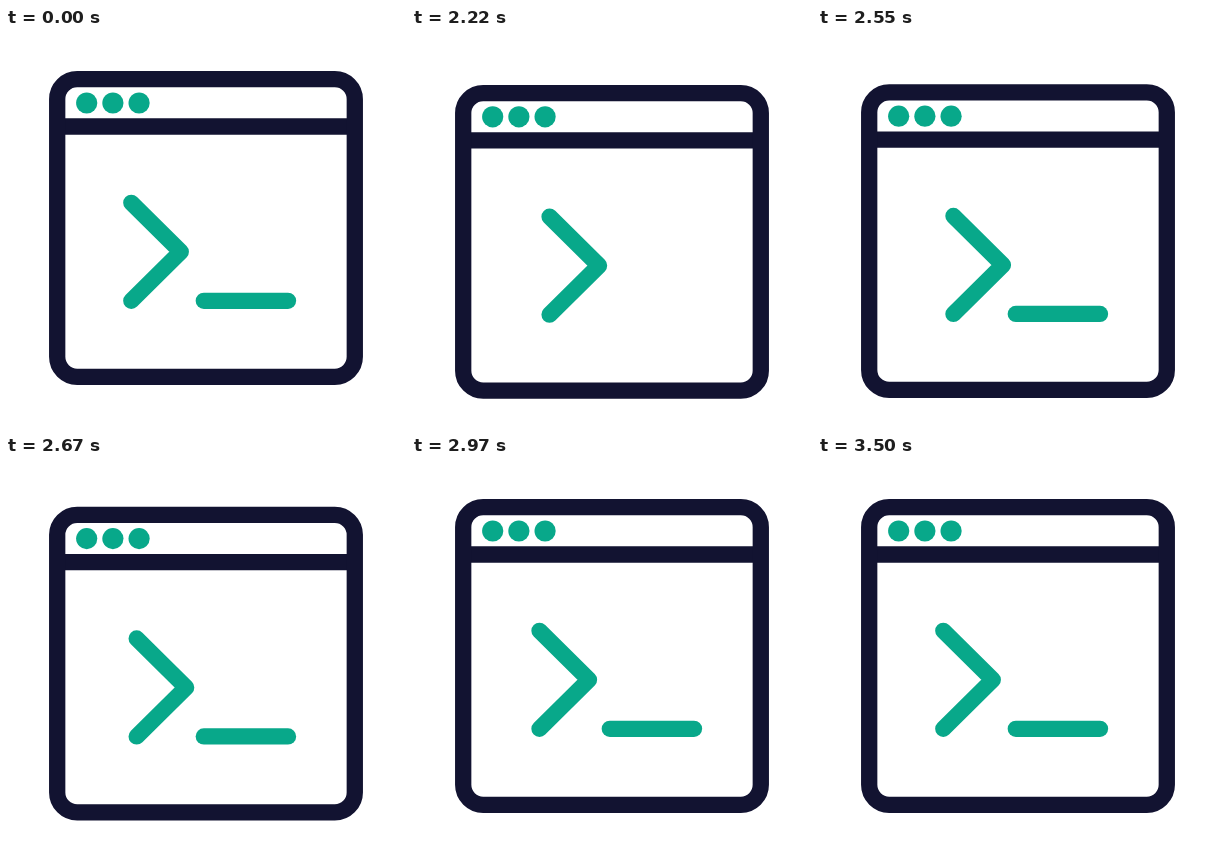
Animation of 400 by 400 pixels, one loop 3.52 s. Source, as an HTML page:

```html
<!DOCTYPE html>
<html lang="en">
<head>
<meta charset="utf-8">
<title>Terminal icon</title>
<style>
  html, body { margin: 0; width: 100%; height: 100%; overflow: hidden; background: #fff; }
  svg { display: block; width: 100%; height: 100%; }
  .dark { stroke: #121331; }
  .green { stroke: #08a88a; stroke-linecap: round; stroke-linejoin: round; }
</style>
</head>
<body>
<svg viewBox="0 0 400 400" fill="none" stroke-width="16.3">
  <g id="icon">
    <g fill="#08a88a">
      <circle cx="80.7" cy="75" r="10.6"/>
      <circle cx="106.9" cy="75" r="10.6"/>
      <circle cx="133.1" cy="75" r="10.6"/>
    </g>
    <path class="dark" d="M51.2 98.5H348.8"/>
    <rect class="dark" x="51.2" y="51.2" width="297.6" height="297.6" rx="20"/>
    <path id="prompt" class="green" d="M125.3 174.8L174.8 223.8L125.3 272.8"/>
    <path id="cursor" class="green" d="M197.8 272.8H282"/>
  </g>
</svg>
<script>
  const LOOP = 3520, START = 2000;
  const $ = id => document.getElementById(id);
  const icon = $('icon'), prompt = $('prompt'), cursor = $('cursor');

  // Keys are [ms, value]; each span eases in and out.
  const drop = [[0, 0], [333, 18.8], [933, 0]];
  const nudge = [[0, 0], [317, 15.7], [900, 0], [1200, 15.5], [1500, 0]];
  const hidden = [[200, 533], [1083, 1417]];

  const ease = s => s * s * (3 - 2 * s);

  function valueAt(keys, t) {
    if (t <= keys[0][0]) return keys[0][1];
    for (let i = 1; i < keys.length; i++) {
      const [t0, a] = keys[i - 1], [t1, b] = keys[i];
      if (t < t1) return a + (b - a) * ease((t - t0) / (t1 - t0));
    }
    return keys[keys.length - 1][1];
  }

  function draw(ms) {
    const t = ms % LOOP - START;
    icon.setAttribute('transform', `translate(0 ${valueAt(drop, t)})`);
    prompt.setAttribute('transform', `translate(${valueAt(nudge, t)} 0)`);
    const off = hidden.some(([from, to]) => t >= from && t < to);
    cursor.setAttribute('visibility', off ? 'hidden' : 'visible');
  }

  const begin = performance.now();
  function tick() {
    draw(performance.now() - begin);
    requestAnimationFrame(tick);
  }
  tick();
</script>
</body>
</html>
```
